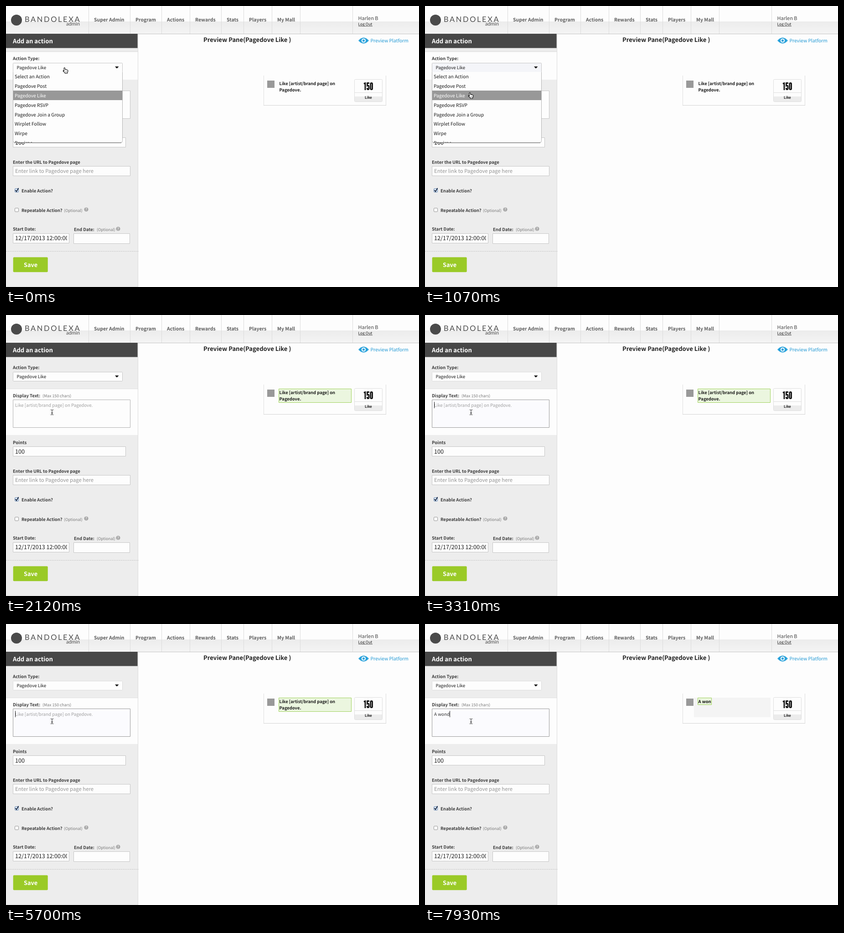
An HTML page with a canvas for the animation above (8000 ms loop, 906 by 618 pixels).

```html
<!DOCTYPE html>
<html lang="en">
<head>
<meta charset="utf-8">
<title>Add an action</title>
<style>
html, body { margin: 0; width: 100%; height: 100%; overflow: hidden; background: #fdfdfd; }
canvas { display: block; width: 906px; height: 618px; }
</style>
</head>
<body>
<canvas id="stage" width="906" height="618"></canvas>
<script>
const ctx = document.getElementById('stage').getContext('2d');
const LOOP = 8000;
const SANS = '"Noto Sans CJK SC", "Noto Sans CJK JP", "Noto Sans CJK", "Open Sans", sans-serif';
const DARK = '#3c3c3c', INK = '#1c1c1c', GREY = '#777', BLUE = '#2098d4';
const NET = 'Pagedove';
const HINT = `Like [artist/brand page] on ${NET}.`;
const MENU = ['Select an Action', NET + ' Post', NET + ' Like', NET + ' RSVP',
  NET + ' Join a Group', 'Wirplet Follow', 'Wirpe', 'Rewirpe'];
const ROW = 20.8, MENU_TOP = 145;

// Time, x, y of the pointer
const POINTER = [
  [0, 130, 142], [300, 128, 150], [450, 120, 172], [600, 109, 200], [770, 103, 215],
  [920, 102, 212], [1070, 100, 197], [1370, 100, 195], [1970, 101, 205], [2120, 101, 214]
];
// Time, text in the field
const TYPED = [[0, ''], [4810, 'a'], [5700, ''], [6600, 'A'], [6750, 'A '],
  [7040, 'A w'], [7490, 'A wo'], [7790, 'A won'], [7930, 'A wond']];
// Time, text in the preview card
const SHOWN = [[0, ''], [4950, 'a'], [5700, ''], [6750, 'A'], [7190, 'A w'],
  [7640, 'A wo'], [7930, 'A won']];
const CARET = [[0, false], [3310, true], [3910, false], [4360, true], [5400, false],
  [5700, true], [6300, false], [6600, true]];

const at = (steps, t) => steps.reduce((hit, s) => t >= s[0] ? s : hit);

function setFont(size, weight = 400, family = SANS) {
  ctx.font = `${weight} ${size}px ${family}`;
}

function text(str, x, y, size, color = DARK, weight = 400, family = SANS) {
  setFont(size, weight, family);
  ctx.fillStyle = color;
  ctx.fillText(str, x, y);
}

const bold = (str, x, y, size, color = DARK) => text(str, x, y, size, color, 700);

function rect(x, y, w, h, color) {
  ctx.fillStyle = color;
  ctx.fillRect(x, y, w, h);
}

function box(x, y, w, h, fill, stroke, r = 0) {
  ctx.beginPath();
  ctx.roundRect(x + 0.5, y + 0.5, w - 1, h - 1, r);
  ctx.fillStyle = fill;
  ctx.fill();
  ctx.strokeStyle = stroke;
  ctx.lineWidth = 1;
  ctx.stroke();
}

function disc(x, y, r, color) {
  ctx.fillStyle = color;
  ctx.beginPath();
  ctx.arc(x, y, r, 0, Math.PI * 2);
  ctx.fill();
}

function shape(points, fill, stroke, width = 1) {
  ctx.beginPath();
  points.forEach(([x, y]) => ctx.lineTo(x, y));
  if (fill) {
    ctx.closePath();
    ctx.fillStyle = fill;
    ctx.fill();
  }
  if (stroke) {
    ctx.strokeStyle = stroke;
    ctx.lineWidth = width;
    ctx.stroke();
  }
}

function header() {
  rect(0, 0, 906, 34, '#fdfdfd');
  const g = ctx.createLinearGradient(0, 34, 0, 61);
  g.addColorStop(0, '#ececec');
  g.addColorStop(1, '#f4f4f4');
  rect(0, 34, 906, 27, g);
  rect(0, 61, 906, 1, '#c4c4c4');
  for (const x of [181, 272, 341, 403, 472, 521, 583, 645, 760]) rect(x, 0, 1, 61, '#dcdcdc');

  disc(23, 31, 12, '#4a4a4a');
  ctx.letterSpacing = '2.6px';
  text('BANDOLEXA', 41, 34.5, 16.5, '#4c4c4c', 400, 'Lato, sans-serif');
  ctx.letterSpacing = '0px';
  text('admin', 132, 43, 11.2, '#4c4c4c', 400, 'Lato, sans-serif');

  const nav = { 'Super Admin': 193, Program: 284, Actions: 353, Rewards: 415,
    Stats: 484, Players: 533, 'My Mall': 595 };
  for (const name in nav) bold(name, nav[name], 34, 10.5, '#5a5a5a');
  text('Harlen B', 772.5, 31, 11, '#444');
  text('Log Out', 772.5, 43, 8.5, INK);
  rect(773, 44, 31, 1, '#666');
}

function eye(x, y) {
  ctx.fillStyle = '#2ba3dc';
  ctx.beginPath();
  ctx.moveTo(x - 11.5, y);
  ctx.quadraticCurveTo(x, y - 13, x + 11.5, y);
  ctx.quadraticCurveTo(x, y + 13, x - 11.5, y);
  ctx.fill();
  disc(x, y, 4.6, '#fdfdfd');
  disc(x, y, 2.6, '#2ba3dc');
}

function digits() {
  ctx.strokeStyle = '#111';
  ctx.lineWidth = 2.8;
  ctx.lineJoin = 'miter';
  ctx.beginPath();
  ctx.moveTo(785, 171);
  ctx.lineTo(788, 169.5);
  ctx.moveTo(788, 168);
  ctx.lineTo(788, 185);
  ctx.moveTo(797, 169.5);
  ctx.lineTo(792.5, 169.5);
  ctx.lineTo(792.5, 175.8);
  ctx.lineTo(794.5, 175);
  ctx.quadraticCurveTo(796, 175, 796, 177);
  ctx.lineTo(796, 181.5);
  ctx.quadraticCurveTo(796, 183.6, 794.2, 183.6);
  ctx.quadraticCurveTo(792.5, 183.6, 792.5, 181.5);
  ctx.lineTo(792.5, 180);
  ctx.stroke();
  ctx.beginPath();
  ctx.roundRect(799.8, 169.3, 3.8, 14.4, 1.9);
  ctx.stroke();
}

function preview(t) {
  bold(`Preview Pane(${NET} Like )`, 433, 79, 13.1, '#222');
  eye(784.5, 76);
  text('Preview Platform', 799.5, 80, 10.4, BLUE);

  rect(565, 153, 1, 66, '#dedede');
  rect(833, 153, 1, 66, '#dedede');
  rect(565, 218, 269, 1, '#d4d4d4');
  rect(573, 164, 16, 16, '#999');

  const shown = at(SHOWN, t)[1];
  if (shown) {
    setFont(9.4, 700);
    const w = Math.round(ctx.measureText(shown).width) + 3;
    rect(590, 162, 168, 43, '#f4f4f4');
    box(598, 162, w, 16, '#ebf6df', '#a0d25c');
    bold(shown, 599.5, 173.5, 9.4, '#111');
  } else {
    if (t >= 1520) box(598, 162, 160, 31, '#ebf6df', '#a0d25c');
    bold('Like [artist/brand page] on', 599.5, 173.5, 9.4, INK);
    bold(NET + '.', 599.5, 188, 9.4, INK);
  }

  box(764, 161, 62, 50, '#fdfdfd', '#dedede', 2);
  rect(765, 190, 60, 1, '#dedede');
  rect(765, 199, 60, 11, '#ececec');
  digits();
  bold('Like', 787, 203.8, 7.8, INK);
}

function help(x, y) {
  disc(x, y, 4.6, '#a8a8a8');
  bold('?', x - 1.9, y + 2.9, 7.5, '#eee');
}

function form(t, open) {
  const focus = t >= 3310;
  rect(0, 62, 289, 556, '#ededed');
  rect(289, 62, 1, 556, '#dadada');
  rect(0, 617, 290, 1, '#dadada');
  rect(0, 92, 289, 1, '#d8d8d8');
  rect(0, 61, 288.6, 31.4, '#474747');
  bold('Add an action', 15, 82, 13.1, '#fff');

  if (t < 1520) {
    rect(0, 100, 289, 62, '#fdfdfd');
    rect(0, 100, 289, 1, '#dcdcdc');
  } else {
    rect(0, 162, 289, 102, '#fdfdfd');
    rect(0, 162, 289, 1, '#e2e2e2');
  }

  bold('Action Type:', 15, 119, 9.6);
  const hot = t >= 300 && t < 1520;
  box(15, 125, 241, 21, hot ? '#f4f5f9' : '#fdfdfd', focus ? '#dcdcdc' : '#c6c6c6', 1);
  text(NET + ' Like', 23.5, 138.5, 9.7, INK);
  shape([[239, 133], [247.5, 133], [243.2, 137.5]], '#111');

  bold('Display Text:', 15, 181, 9.6);
  text('(Max 150 chars)', 80, 181, 8.8, GREY);
  box(15, 186, 258, 62, focus ? '#fbfbfe' : '#fdfdfd', focus ? '#9a9a9a' : t < 1520 ? '#c6c6c6' : '#b0b0b0');

  const typed = at(TYPED, t)[1];
  text(typed || HINT, 20, 202, 9.8, typed ? '#333' : '#a0a0a0');
  if (at(CARET, t)[1]) {
    setFont(9.8);
    rect(20 + Math.round(ctx.measureText(typed).width), 191, 1, 14, '#222');
  }

  bold('Points', 15, 283.5, 9.7);
  box(15, 289, 248, 22, '#fdfdfd', '#c6c6c6');
  text('100', 20, 304.5, 12.6, INK);

  bold(`Enter the URL to ${NET} page`, 15, 346.5, 9.45);
  box(15, 352, 258, 22, '#fdfdfd', '#c6c6c6');
  text(`Enter link to ${NET} page here`, 20, 367.3, 11.3, '#959595');

  box(19, 401, 9, 9, '#dbe8f8', '#6f8db5', 1.5);
  shape([[20.5, 405], [23, 408], [27.5, 400.5]], null, '#16243c', 1.8);
  bold('Enable Action?', 34, 409.5, 9.5);

  box(19, 444, 9, 9, '#fdfdfd', '#999', 1.5);
  bold('Repeatable Action?', 34, 452.8, 9.5);
  text('(Optional)', 127, 452.8, 8.6, GREY);
  help(176, 447.5);

  bold('Start Date:', 15, 494, 9.6);
  box(15, 500, 124, 22, '#fdfdfd', '#c6c6c6');
  ctx.save();
  ctx.beginPath();
  ctx.rect(16, 501, 118, 20);
  ctx.clip();
  text('12/17/2013 12:00:00', 20, 515.3, 12.6, INK);
  ctx.restore();

  bold('End Date:', 149, 495, 9.5);
  text('(Optional)', 199, 495, 8.6, GREY);
  help(246, 490);
  box(148, 500, 124, 23, '#fdfdfd', '#c6c6c6');

  for (let x = 0; x < 289; x += 4) rect(x, 539, 2.5, 1, '#c4c4c4');
  ctx.fillStyle = '#9aca27';
  ctx.beginPath();
  ctx.roundRect(15.7, 552.6, 76, 32.6, 2);
  ctx.fill();
  bold('Save', 39, 573.5, 12.8, '#fff');

  if (open) menu(t);
}

function menu(t) {
  const [, , y] = at(POINTER, t);
  const hover = y < MENU_TOP ? -1 : Math.floor((y - 6 - MENU_TOP) / ROW);
  box(15, 145, 241, 156, '#fdfdfd', '#b4b4b4', [0, 0, 4, 4]);
  rect(16, 145, 239, 1, '#fdfdfd');
  ctx.save();
  ctx.beginPath();
  ctx.rect(16, MENU_TOP, 239, 155);
  ctx.clip();
  MENU.forEach((name, i) => {
    const top = Math.round(MENU_TOP + i * ROW);
    if (i === 2) rect(16, top - 1, 239, 21, '#989898');
    else if (i === hover) rect(16, top, 239, 21, '#c9c9c9');
    text(name, 19, MENU_TOP + i * ROW + 14.3, 10.3, i === 2 ? '#fff' : INK);
  });
  ctx.restore();
  rect(18, 300, 235, 1, '#777');
  rect(18, 301, 235, 1, 'rgba(0,0,0,.2)');
}

function hand(x, y) {
  ctx.save();
  ctx.translate(x - 5, y - 7);
  ctx.lineJoin = 'round';
  shape([[2.5, 8], [2, 2], [2.7, 0.8], [3.9, 0.9], [4.6, 2], [5, 5], [6.5, 4.6], [7.3, 5.3],
    [8.8, 5.1], [9.5, 6], [10.6, 6.2], [11, 7.2], [10.6, 10], [9.6, 11.5], [9.5, 13.3],
    [4.6, 13.3], [4, 11.8], [0.2, 8], [0.6, 6.9], [1.6, 7.1]], '#fff', '#111', 1.1);
  for (const fx of [5.2, 7, 8.8]) rect(fx, 8.7, 0.7, 3, '#444');
  ctx.restore();
}

function beam(x, y) {
  rect(x - 0.5, y - 5, 1, 10, '#222');
  rect(x - 2, y + 1, 4, 1, '#222');
  for (const s of [-1, 1]) {
    shape([[x - 3, y + s * 5.5], [x - 1, y + s * 5.5], [x, y + s * 4.5],
      [x + 1, y + s * 5.5], [x + 3, y + s * 5.5]], null, '#222');
  }
}

function draw(t) {
  const open = t < 1370;
  ctx.textRendering = 'geometricPrecision';
  rect(0, 0, 906, 618, '#fdfdfd');
  header();
  form(t, open);
  preview(t);
  const [, x, y] = at(POINTER, t);
  (open ? hand : beam)(x, y);
}

const start = performance.now();
function tick() {
  draw((performance.now() - start) % LOOP);
  requestAnimationFrame(tick);
}
tick();
</script>
</body>
</html>
```
